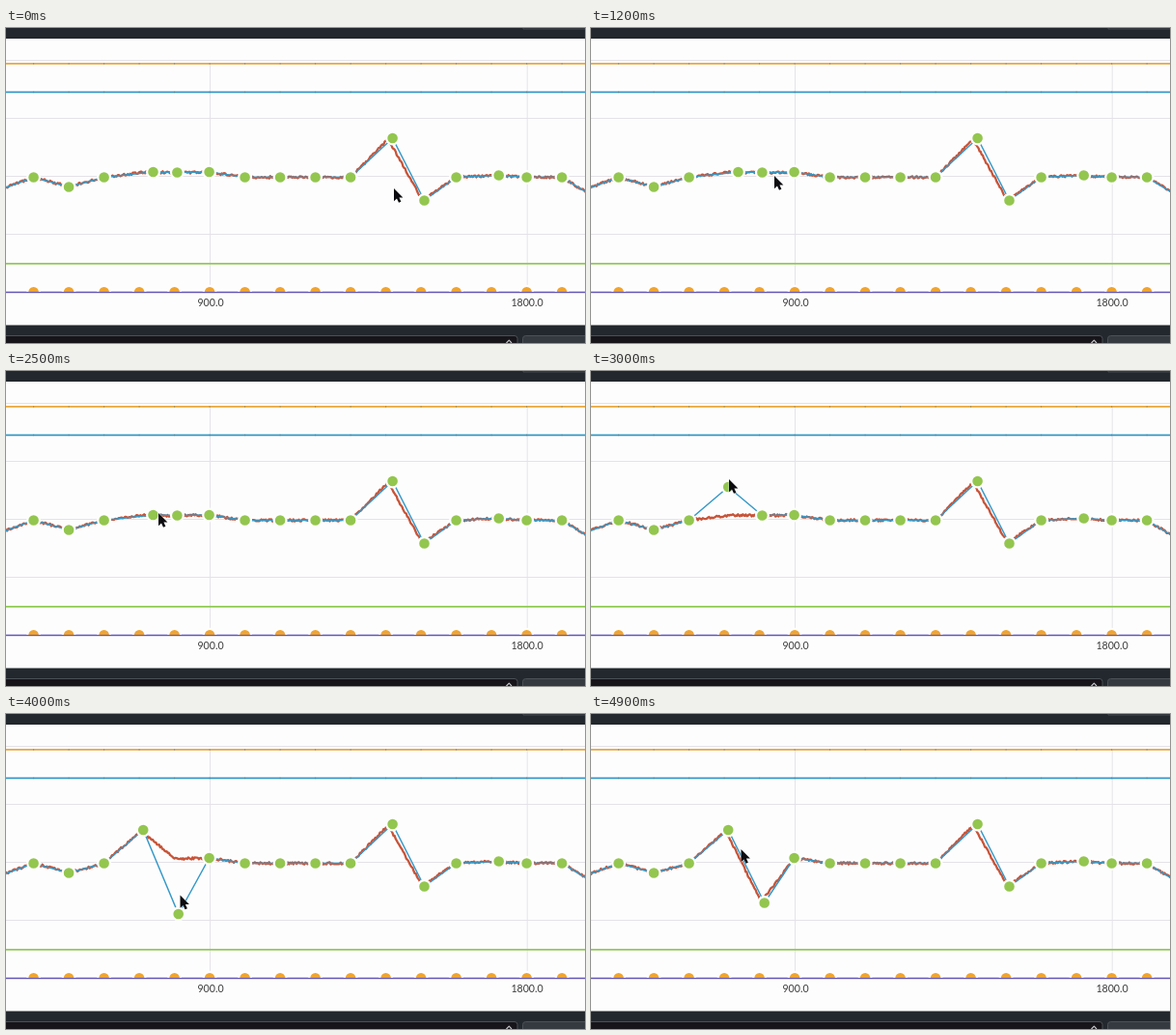
Animation, 600 px wide and 326 px high, one loop 5100 ms. Source, as an HTML page:

```html
<!DOCTYPE html>
<html lang="en">
<head>
<meta charset="utf-8">
<title>Curve editing</title>
<style>
  html, body { margin: 0; width: 100%; height: 100%; overflow: hidden; background: #fefdfe; }
  svg { display: block; width: 100vw; height: 100vh; }
  text { font: 10.6px Lato, "Open Sans", sans-serif; fill: #3c3c3c; text-anchor: middle; }
  .grid { stroke: #e4e2e7; }
  .line { fill: none; stroke-linejoin: round; }
  .dots { stroke: #fefdfe; stroke-width: 2.2; }
</style>
</head>
<body>
<svg viewBox="0 0 600 326" preserveAspectRatio="none">
  <clipPath id="above"><rect width="600" height="273"/></clipPath>
  <rect width="600" height="326" fill="#fefdfe"/>
  <path class="grid" d="M0 33.5H600M0 93.5H600M0 153.5H600M0 213.5H600M211.5 36V273M540.2 36V273"/>
  <path d="M0 36.9H600" stroke="#e8a83c" stroke-width="1.7"/>
  <path d="M0 66.4H600" stroke="#3599c8" stroke-width="1.7"/>
  <path d="M0 243.9H600" stroke="#90cb55" stroke-width="1.7"/>
  <path d="M0 273.4H600" stroke="#6055b8" stroke-width="1.5"/>
  <g id="ticks" stroke="#5d7468" stroke-width="1.6" opacity=".45"></g>
  <g id="marks" class="dots" fill="#efa431" clip-path="url(#above)"></g>
  <text x="212" y="287.5">900.0</text>
  <text x="540" y="287.5">1800.0</text>

  <path id="trace" class="line" stroke="#c85438" stroke-width="2.3"/>
  <path id="curve" class="line" stroke="#3599c8" stroke-width="1.5"/>
  <g id="handles" class="dots" fill="#93c64e"></g>

  <rect width="600" height="11" fill="#22282d"/>
  <path d="M536 0V1H600" fill="none" stroke="#444b50"/>
  <rect y="307.5" width="600" height="19" fill="#22282d"/>
  <rect x="-5" y="318.5" width="535" height="14" rx="3" fill="#17141a" stroke="#4b5156"/>
  <rect x="535.5" y="318.5" width="75" height="14" rx="3" fill="#343a3f" stroke="#4b5156"/>
  <path d="M518.5 326L521.3 323.2L524 326" class="line" stroke="#c4c7ca" stroke-width="1.2"/>

  <path id="cursor" d="M0 0V13.2L3 10.4L5 14.8L7.4 13.7L5.4 9.4H9.4Z" fill="#0c0c10" stroke="#fff" stroke-width=".7" paint-order="stroke"/>
</svg>
<script>
const NS = "http://www.w3.org/2000/svg";
const $ = id => document.getElementById(id);
const LOOP = 5100, STEP = 100, LAST = 4900;
const NOISE_MS = 700, COPY_MS = 1400;
const COUNT = 18, BASE = 154.5, RADIUS = 6.4;
const gridX = i => 28.6 + (i - 1) * 36.5;

// Pointer stops: time, x, y. Every move between them is eased.
const stops = [
  [0, 402, 166], [1200, 190, 153], [1700, 161, 152], [2500, 158, 147],
  [2900, 143, 112], [3000, 143, 112], [3500, 177, 152], [3900, 179.5, 199],
  [4000, 180.5, 187.5], [4900, 155.5, 140]
];

// Points that sit away from their place on the level grid: dx, dy.
const offsets = {
  0: [0, 13.5], 2: [0, 10], 4: [14.4, -5.5], 5: [2.8, -5], 6: [-0.5, -5.5],
  11: [7, -40.5], 12: [3.4, 24], 14: [7.6, -2], 17: [0, 22.5]
};

// Dragged handles trail the pointer by one step.
const drags = [
  { index: 4, grab: 2500, drop: 2900 },
  { index: 5, grab: 3500, drop: 4000 }
];

function pointer(t) {
  const next = Math.max(1, stops.findIndex(s => s[0] >= t));
  const [t0, x0, y0] = stops[next - 1], [t1, x1, y1] = stops[next];
  const u = (t - t0) / (t1 - t0), e = u * u * (3 - 2 * u);
  return [x0 + (x1 - x0) * e, y0 + (y1 - y0) * e];
}

function pointsAt(t) {
  const points = Array.from({ length: COUNT }, (_, i) => {
    const [dx, dy] = offsets[i] || [0, 0];
    return [gridX(i) + dx, BASE + dy];
  });
  for (const { index, grab, drop } of drags) {
    if (t - STEP <= grab) continue;
    const [x, y] = pointer(Math.min(t - STEP, drop));
    points[index] = [x - 0.8, y + 8];
  }
  return points;
}

function random(seed) {
  let s = seed * 7919 + 17;
  return () => (s = (s * 16807) % 2147483647) / 2147483647;
}

// The measured trace copies the curve at intervals, pulled towards the grid.
function traceAt(t) {
  const copied = Math.floor((t + COPY_MS / 2) / COPY_MS) * COPY_MS - COPY_MS / 2;
  const nodes = pointsAt(copied).map(([x, y], i) =>
    [gridX(i) + (x - gridX(i)) * 0.35, BASE + (y - BASE) * 0.97]);
  const rnd = random(Math.floor(t / NOISE_MS) + 1);
  const out = [];
  for (let i = 0; i < COUNT - 1; i++) {
    const [x0, y0] = nodes[i], [x1, y1] = nodes[i + 1];
    for (let u = 0; u < 1; u += 1 / 32) {
      out.push([x0 + (x1 - x0) * u, y0 + (y1 - y0) * u + (rnd() - 0.5) * 2.4]);
    }
  }
  return out;
}

const toPath = list => "M" + list.map(([x, y]) => x.toFixed(2) + " " + y.toFixed(2)).join("L");

function add(parent, tag, attrs) {
  const el = document.createElementNS(NS, tag);
  for (const key in attrs) el.setAttribute(key, attrs[key]);
  return parent.appendChild(el);
}

const handles = [];
for (let i = 0; i < COUNT; i++) {
  const x = gridX(i);
  add($("ticks"), "path", { d: `M${x - 0.5} 36.9h1M${x - 0.5} 66.4h1` });
  add($("marks"), "circle", { cx: x, cy: 273.2, r: RADIUS });
  handles.push(add($("handles"), "circle", { r: RADIUS }));
}

function draw(time) {
  const t = Math.min(Math.floor((time % LOOP) / STEP) * STEP, LAST);
  const points = pointsAt(t);
  points.forEach(([x, y], i) => {
    handles[i].setAttribute("cx", x);
    handles[i].setAttribute("cy", y);
  });
  $("curve").setAttribute("d", toPath(points));
  $("trace").setAttribute("d", toPath(traceAt(t)));
  $("cursor").setAttribute("transform", `translate(${pointer(t).join(" ")})`);
}

const start = performance.now();
function tick() {
  draw(performance.now() - start);
  requestAnimationFrame(tick);
}
tick();
</script>
</body>
</html>
```
